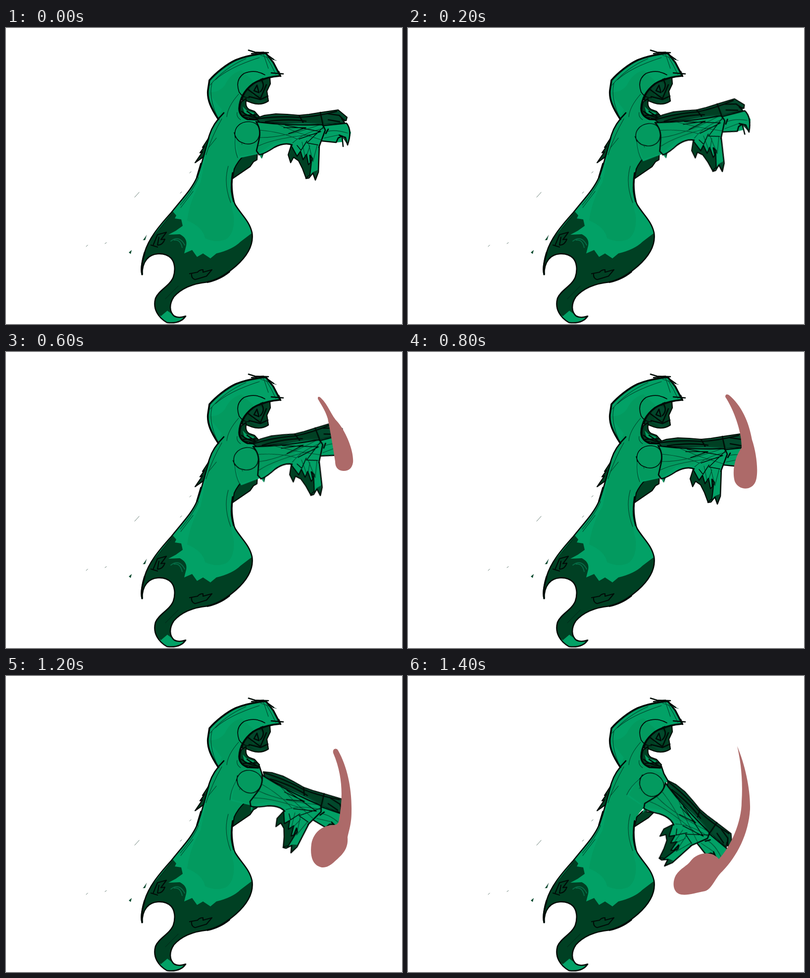
An HTML page for the animation above (1600 ms loop, 800 by 600 pixels).

```html
<!DOCTYPE html>
<html lang="en">
<head>
<meta charset="utf-8">
<title>Reaching ghost</title>
<style>
html, body { margin: 0; width: 100%; height: 100%; overflow: hidden; background: #fff; }
svg { display: block; width: 100vw; height: 100vh; }
.light { fill: #02a166; }
.mid { fill: #039a5f; }
.dark { fill: #004023; }
.deep { fill: #02482c; }
.smear { fill: #ad6a69; }
.ink { fill: none; stroke: #000c07; stroke-width: 2.6; stroke-linecap: round; stroke-linejoin: round; }
.bold { stroke-width: 3.6; }
.thin { stroke-width: 1.1; stroke: #00281a; opacity: .75; }
.edge { stroke: #000c07; stroke-width: 2.2; stroke-linejoin: round; }
</style>
</head>
<body>
<svg viewBox="0 0 800 600">
  <defs>
    <path id="shape" d="M411 106 C424 91 445 74 464 65 C484 57 506 53 525 51 L540 70 L554 97
      C530 99 512 105 499 113 C481 127 472 145 471 163 C471 174 478 181 488 185 L500 187 L513 184 L517 198 L526 214 L500 225 L482 262
      C466 276 457 290 457 306 C453 325 456 343 463 358 C474 377 492 391 497 415 C501 441 485 464 465 482
      C450 495 432 509 407 515 C376 518 353 529 339 545 C329 560 330 576 340 584 Q349 589 363 584
      C356 595 342 599 325 597 C308 587 296 570 302 548 C309 531 331 523 338 505 C343 490 341 474 333 466
      C319 453 294 456 284 469 Q275 480 275 500 C271 488 276 471 280 455 C288 428 307 404 334 374
      C356 346 376 326 386 302 C397 275 402 244 411 217 Q417 198 430 184 C414 162 406 145 408 126Z"/>
    <clipPath id="inside"><use href="#shape"/></clipPath>
  </defs>

  <use href="#shape" class="light"/>
  <g clip-path="url(#inside)">
    <path class="mid" d="M408 130 Q430 132 442 116 Q455 90 476 86 L500 108 Q475 130 471 163 L484 188 L526 200 L480 262 L454 300
      Q450 345 460 380 Q463 415 445 428 Q425 437 402 426 Q398 404 366 390 Q371 350 393 313 L412 220 L436 165Z"/>
    <path class="dark" d="M337 372 L344 380 L341 386 L354 388 L357 401 L343 411 L328 419 L351 418 Q367 426 364 441 L360 457 L369 453 L376 450 L386 464
      L398 457 L413 467 L425 457 Q458 449 474 433 L499 414 L520 520 L370 560 L334 579 L326 573 L313 584 L270 560 L250 480Z"/>
    <path class="ink" style="stroke:#056b45;stroke-width:2" d="M333 432 Q350 419 361 440 M340 430 Q352 428 356 445"/>
  </g>

  <!-- face and collar -->
  <path class="dark edge" d="M533 100 L534 113 L527 128 L530 148 Q515 158 497 152 L484 147 L477 146 Q481 126 500 112Z"/>
  <path class="deep" d="M492 122 L509 108 L522 116 L516 135 L499 138Z M489 140 L515 145 L526 148 L511 153Z"/>
  <path class="ink" d="M501 127 L507 116 L511 131 Z M488 124 L514 143 L526 115 M515 104 Q525 117 514 129 M491 139 L514 145 L529 138"/>
  <path class="dark edge" d="M485 143 L475 150 Q468 173 480 181 L510 186 L512 180 L502 169 L491 165 Q483 160 485 148Z"/>
  <path class="mid" d="M478 159 L486 167 L501 172 L500 178 L482 174Z"/>
  <path class="ink" d="M480 177 L506 176 M487 169 L505 181 M476 169 Q490 181 512 183 L517 198 L526 214"/>

  <!-- main contour -->
  <path class="ink bold" d="M429 185 C414 162 406 145 408 126 L411 106 C424 91 445 74 464 65 C484 57 506 53 525 51 L540 70 L554 97
    C530 99 512 105 499 113 C481 127 472 145 471 163 C471 174 478 181 488 185 L510 186"/>
  <path class="ink" d="M440 172 Q418 194 411 217 C402 244 397 275 386 302 C376 326 356 346 334 374 C307 404 288 428 280 455 C276 471 271 488 275 500
    Q275 480 284 469 C294 456 319 453 333 466 C341 474 343 490 338 505 C331 523 309 531 302 548 C296 570 308 587 325 597
    C342 599 356 595 363 584 Q349 589 340 584 C330 576 329 560 339 545 C353 529 376 518 407 515 C432 509 450 495 465 482
    C485 464 501 441 497 415 C492 391 474 377 463 358 C456 343 453 325 457 306"/>
  <path class="ink bold" d="M458 294 Q453 321 460 351 M275 499 Q272 482 280 456 M407 515 Q431 510 451 494 M394 275 L386 302"/>
  <path class="ink" d="M490 45 L503 49 L530 50 M496 52 L520 49 L541 64 M536 91 L560 93 M551 88 L555 98"/>
  <path class="ink thin" d="M416 112 Q409 140 426 178 M412 116 Q441 81 485 62 M423 105 Q450 80 512 60 M470 134 Q448 159 446 180
    M526 58 Q537 76 545 94 M520 52 L530 82 M514 55 L546 66 M436 184 Q417 217 404 257 M425 223 L408 244 M389 303 Q379 327 352 359
    M378 331 L353 364 M449 280 Q439 316 454 354 M335 378 L311 407 M348 523 L322 549 M467 171 Q465 180 474 186"/>
  <path class="ink" style="stroke-width:1.7" d="M523 95 Q503 83 481 92 Q462 105 471 130 Q480 143 492 141 M475 145 Q483 119 519 102"/>
  <path class="dark edge" d="M410 222 L397 242 L401 240 L392 253 L397 251 L382 273 L399 261Z"/>
  <path class="ink" style="stroke-width:2.2" d="M297 441 L306 419 L324 414 L313 429 L321 428 Q316 441 306 440 L309 424 M293 440 L306 444
    M371 498 L387 495 Q391 490 398 490 L398 495 L416 490 L405 503 L382 510 Q374 507 375 499"/>
  <path class="ink thin" style="stroke-width:.8" d="M260 343 L269 333 M277 430 L284 420 M162 443 L165 440 M200 437 L203 435 M352 335 L355 332 M371 294 L374 291"/>
  <path class="deep" d="M248 455 L254 450 L252 458Z M277 430 L284 421 L281 430Z"/>

  <!-- far sleeve under the shoulder -->
  <path id="foldLong" class="dark edge" d="M458 305 L461 286 Q468 270 482 257 L508 249 L507 267 L500 271 L493 281Z"/>
  <path id="foldShort" class="dark edge" d="M458 305 L462 286 L474 274 L496 277 L486 287Z"/>

  <g id="arm">
    <path class="deep edge" d="M505 183 L522 177 L545 174 L568 175 L592 177 L612 175 L637 171 L671 166 L689 181 L687 188 L678 184 L684 192 L641 196 L560 193 L512 191Z"/>
    <path class="dark" d="M513 184 L545 179 L593 181 L637 176 L643 193 L597 189 L548 190Z"/>
    <path class="ink" d="M508 184 Q550 178 592 181 Q625 180 668 169 M592 177 L600 191 M635 171 L640 195 M651 174 L673 177 L684 188 M651 186 L674 190 M524 190 Q570 183 606 189"/>
    <path class="light" d="M470 193 Q493 185 513 191 C560 196 600 191 640 196 L688 192 L697 212 L691 237 L687 222 L680 221 L681 231 L667 232 L637 229
      L633 243 L631 292 L625 309 L620 294 L612 304 L606 305 L599 284 L591 266 L586 261 L581 262 L575 273 L570 257 L576 238
      C560 232 541 240 521 254 L516 265 L511 255 L470 264 C458 240 457 208 470 193Z"/>
    <path class="mid" d="M471 194 L513 193 L628 198 L594 208 L576 228 L542 232 L512 253 L471 260 Q459 226 471 194Z"/>
    <path class="dark edge" d="M576 238 L570 257 L575 273 L581 262 L591 269 L599 285 L606 304 L614 298 L617 271 L611 277 L607 256 L600 267 L595 250 L588 260Z"/>
    <path class="deep" d="M614 256 L620 263 L616 276Z M620 292 L630 288 L625 308Z M516 255 L521 254 L517 265Z M680 222 L686 222 L690 237Z"/>
    <path class="ink" d="M505 190 Q560 198 640 196 M506 191 Q516 207 511 227 L506 249 L511 256 M511 257 Q521 256 542 242 Q563 231 578 237
      M633 238 L631 292 L625 308 L620 294 L612 304 L606 305 M640 196 L645 207 L632 242 M638 229 L667 232 L671 223 L679 219 L681 240
      M640 198 L688 193 Q700 208 690 237 L686 222 L673 217 M651 205 L646 214 M614 258 L619 265 L615 274Z"/>
    <path class="ink" style="stroke-width:1.5" d="M463 222 C459 200 475 189 492 190 C508 191 516 203 511 220 C506 236 488 238 476 232 Q465 228 461 212
      M561 202 L606 202 L571 214 M564 197 L636 210 L592 225 M641 201 L608 233 L630 237 M588 238 L596 248 L608 229"/>
    <path class="ink thin" d="M513 207 Q557 211 588 225 M513 222 Q560 223 638 195 M510 239 Q546 222 628 215 M543 193 L590 212 L638 227
      M579 233 Q604 210 645 203 M611 233 L620 271 L629 236 M598 231 L605 265 L614 239 M647 210 Q665 205 690 213 M643 223 L671 217
      M463 222 Q461 245 468 263 M476 234 L477 236"/>
  </g>

  <path class="smear" data-step="2" d="M627 118 C627 101 640 91 659 91 C691 91 701 140 698 190 C697 225 691 250 687 257 Q683 258 683 252 C687 214 685 164 672 143 C650 148 627 138 627 118Z"/>
  <path class="smear" data-step="3" d="M630 92 Q632 89 636 93 C652 108 656 128 671 143 C690 167 703 204 701 224 C699 236 692 241 683 241 C673 241 665 236 665 222 C660 190 656 165 650 135 C645 118 635 104 630 95Z"/>
  <path class="smear" data-step="4" d="M641 91 Q641 84 648 87 C674 108 689 143 695 178 C704 204 709 246 702 263 C694 282 668 281 660 262 C654 240 661 211 674 194 C674 160 658 117 641 91Z"/>
  <path class="smear" data-step="5" d="M657 122 Q655 115 662 116 C690 135 702 175 705 215 C710 245 709 270 703 287 C695 306 682 314 672 314 C656 313 646 300 646 280 C647 249 660 218 688 216 C688 180 675 147 657 122Z"/>
  <path class="smear" data-step="6" d="M661 156 C659 147 668 145 671 151 C690 185 699 230 698 275 C698 300 693 312 690 327 C692 352 678 363 665 375 C651 389 640 390 632 386 C618 380 614 362 617 340 C622 315 640 303 662 302 Q672 302 673 290 C680 250 682 205 661 156Z"/>
  <path class="smear" data-step="7" d="M665 142 C681 180 692 230 691 270 C688 320 665 365 635 396 C619 411 615 431 600 436 C580 440 565 445 552 443 C535 440 533 419 541 404 C551 389 564 385 571 375 C585 356 615 354 628 371 C652 346 674 296 674 255 C677 210 672 172 665 142Z"/>
</svg>
<script>
// one entry per 200 ms: pivot x, pivot y, angle
const rest = [490, 220, 0];
const raised = [514, 232, -8.5];
const poses = [rest, raised, [492, 241, -19.5], raised, rest, [474, 233, 9.3], [487, 222, 25], [481, 221, 46]];

function play(el, steps) {
  const frames = steps.map((s, i) => ({ ...s, offset: i / steps.length, easing: 'steps(1, end)' }));
  frames.push({ ...steps[steps.length - 1], offset: 1 });
  el.animate(frames, { duration: 200 * steps.length, iterations: Infinity });
}

function show(el, test) {
  play(el, poses.map((_, i) => ({ opacity: test(i) ? 1 : 0 })));
}

const byId = id => document.getElementById(id);

play(byId('arm'), poses.map(([x, y, a]) => ({
  transform: `translate(${x}px, ${y}px) rotate(${a}deg) translate(${-x}px, ${-y}px)`
})));
show(byId('foldLong'), i => i < 7);
show(byId('foldShort'), i => i === 7);
document.querySelectorAll('.smear').forEach(el => show(el, i => i === +el.dataset.step));
</script>
</body>
</html>
```
